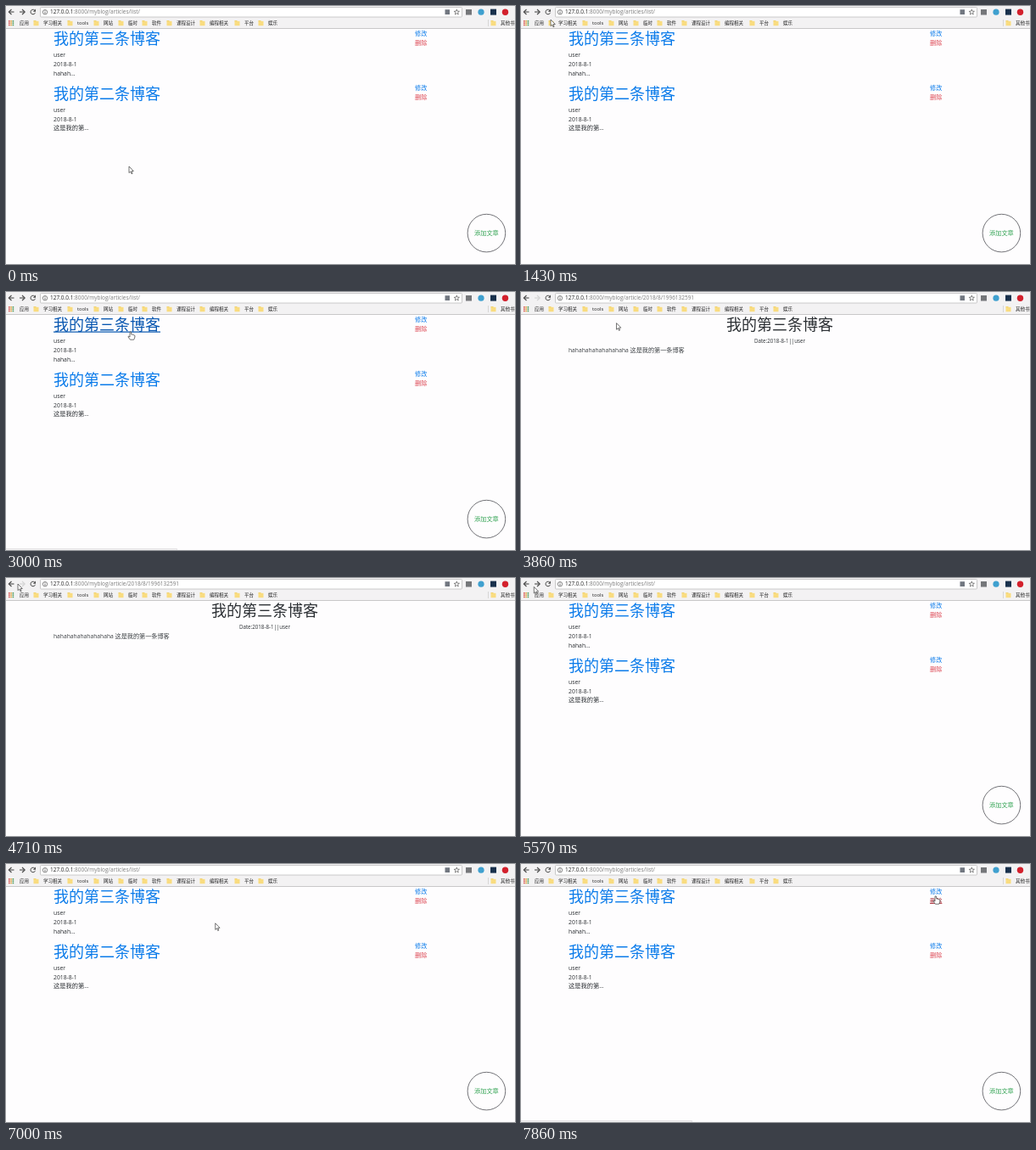
Animation, 600 px wide and 304 px high, one loop 8 s. Source, as an HTML page with a canvas:

```html
<!DOCTYPE html>
<html lang="zh">
<head>
<meta charset="utf-8">
<style>
html, body { margin: 0; width: 100%; height: 100%; overflow: hidden; background: #fefdfe; }
canvas { display: block; }
</style>
</head>
<body>
<canvas id="stage" width="600" height="304"></canvas>
<script>
const ctx = document.getElementById('stage').getContext('2d');
const LOOP = 8000, STEP = 1000 / 7;
const ARTICLE_OPEN = 24, ARTICLE_CLOSE = 38;
const INK = '#2b2f33', BLUE = '#0a7bea', RED = '#dc4450', ICON = '#4c4c4c';

// Pointer stops: step, x, y
const stops = [
  [0, 145, 189], [6, 46, 62], [8, 30, 9], [10, 35, 16], [17, 172, 157],
  [21, 147, 47], [24, 147, 47], [33, 14, 7], [35, 8, 5], [38, 8, 5],
  [43, 78, 57], [47, 170, 76], [53, 466, 52], [55, 489, 38]
];

const posts = [
  { y: 0, title: '我的第三条博客', intro: 'hahah...' },
  { y: 64.6, title: '我的第二条博客', intro: '这是我的第...' }
];

const bookmarks = [
  [44, '学习相关'], [84, 'tools'], [115, '网站'], [144, '临时'], [172, '软件'],
  [201, '课程设计'], [240, '编程相关'], [281, '平台'], [309, '娱乐'], [583, '其他书签']
];

function rect(x, y, w, h, color) {
  ctx.fillStyle = color;
  ctx.fillRect(x, y, w, h);
}

function disc(x, y, r, color) {
  ctx.fillStyle = color;
  ctx.beginPath();
  ctx.arc(x, y, r, 0, Math.PI * 2);
  ctx.fill();
}

function ring(x, y, r, color, width, from = 0, to = Math.PI * 2) {
  ctx.strokeStyle = color;
  ctx.lineWidth = width;
  ctx.beginPath();
  ctx.arc(x, y, r, from, to);
  ctx.stroke();
}

function path(points, x, y) {
  ctx.beginPath();
  points.forEach(([px, py], i) => ctx[i ? 'lineTo' : 'moveTo'](x + px, y + py));
}

function line(points, color, width = 1) {
  path(points, 0, 0);
  ctx.strokeStyle = color;
  ctx.lineWidth = width;
  ctx.stroke();
}

function setFont(run, size) {
  const latin = run.charCodeAt(0) < 256;
  ctx.font = latin
    ? `${size * 0.94}px "Open Sans", sans-serif`
    : `${size}px "Noto Sans CJK SC", "Noto Sans CJK", sans-serif`;
}

// Latin runs are set slightly smaller than the Chinese ones.
function text(str, x, y, size, color, center = false) {
  const runs = str.match(/[\x00-\xff]+|[^\x00-\xff]+/g);
  const widths = runs.map(run => {
    setFont(run, size);
    return ctx.measureText(run).width;
  });
  const total = widths.reduce((a, b) => a + b, 0);
  let at = center ? x - total / 2 : x;
  ctx.fillStyle = color;
  runs.forEach((run, i) => {
    setFont(run, size);
    ctx.fillText(run, at, y);
    at += widths[i];
  });
  return at;
}

function arrow(x, dir, color) {
  line([[x - 3 * dir, 7], [x + 3 * dir, 7]], color, 1.1);
  line([[x, 4], [x + 3.2 * dir, 7], [x, 10]], color, 1.1);
}

function folder(x) {
  rect(x, 17, 3, 1.2, '#efcf6c');
  rect(x, 17.8, 6, 5.4, '#f9dc80');
}

function star(x, y) {
  const points = Array.from({ length: 11 }, (_, i) => {
    const a = i * Math.PI / 5, r = i % 2 ? 1.4 : 3.3;
    return [x + r * Math.sin(a), y - r * Math.cos(a)];
  });
  line(points, '#555', 0.7);
}

function drawToolbar(article) {
  rect(0, 0, 600, 27, '#f3f2f3');
  rect(0, 26, 600, 1, '#c9c8c9');
  arrow(6.5, -1, ICON);
  arrow(19, 1, article ? '#d4d4d4' : ICON);
  ring(31.8, 7, 2.8, ICON, 1, 0.3, 5.5);
  path([[35, 3.6], [35, 6.8], [31.8, 6.8]], 0, 0);
  ctx.fillStyle = ICON;
  ctx.fill();

  ctx.beginPath();
  ctx.roundRect(40.5, 1.5, 497, 11.5, 1);
  ctx.fillStyle = '#fff';
  ctx.fill();
  ctx.strokeStyle = '#bdbdbd';
  ctx.lineWidth = 0.8;
  ctx.stroke();
  ring(46, 7.2, 2.7, '#555', 0.7);
  rect(45.6, 5.5, 0.8, 0.8, '#444');
  rect(45.6, 6.8, 0.8, 2, '#444');
  const x = text('127.0.0.1', 52, 9.4, 6.9, '#222');
  text(':8000/myblog/' + (article ? 'article/2018/8/1996132591' : 'articles/list/'), x, 9.4, 6.9, '#7c7c7c');

  rect(517.5, 4.2, 5.5, 5.8, '#717780');
  star(531.3, 7.3);
  rect(542, 4, 7, 6.5, '#75777a');
  disc(560, 7.2, 3.6, '#3fa0cf');
  rect(571, 3.6, 7, 7, '#18304c');
  disc(588.5, 7.2, 3.7, '#d3202c');

  const dots = ['#d9544f', '#e0a33c', '#4d9a5c', '#4b7fc4'];
  for (let i = 0; i < 9; i++) {
    const row = Math.floor(i / 3);
    rect(3 + (i % 3) * 2.3, 17 + row * 2.3, 1.6, 1.6, dots[(i + row) % 4]);
  }
  text('应用', 16, 22.2, 5.5, '#222');
  for (const [bx, label] of bookmarks) {
    folder(bx - 11.5);
    text(label, bx, 22.2, label === 'tools' ? 6.2 : 5.5, '#222');
  }
  rect(568, 16, 0.8, 8, '#cfcfcf');
}

function links() {
  return posts.flatMap(({ y, title }) => [
    { label: title, x: 56, top: y + 28, w: 126, h: 22, base: y + 45.4, size: 18, color: BLUE, dark: '#0756b0' },
    { label: '修改', x: 482, top: y + 27, w: 14.4, h: 10.6, base: y + 34.8, size: 7.2, color: BLUE, dark: '#0756b0' },
    { label: '删除', x: 482, top: y + 37.6, w: 14.4, h: 10.6, base: y + 45.6, size: 7.2, color: RED, dark: '#a72430' }
  ]);
}

function drawList(px, py) {
  let hover = false;
  for (const l of links()) {
    const on = px >= l.x && px <= l.x + l.w && py >= l.top && py < l.top + l.h;
    text(l.label, l.x, l.base, l.size, on ? l.dark : l.color);
    if (on) rect(l.x, l.base + l.size * 0.06, l.w, l.size > 10 ? 1.2 : 0.7, l.dark);
    hover = hover || on;
  }
  for (const { y, intro } of posts) {
    ['user', '2018-8-1', intro].forEach((s, i) => text(s, 56, y + 60.4 + i * 10.7, 7.25, INK));
  }
  ring(566.4, 267.6, 22.3, '#505056', 0.8);
  text('添加文章', 566.4, 270.4, 7.2, '#35a455', true);
  if (hover) {
    rect(0, 302, 202, 2, '#f4f3f4');
    line([[0, 302.5], [201.5, 302.5], [201.5, 304]], '#e2e1e2', 0.8);
  }
  return hover;
}

function drawArticle() {
  text('我的第三条博客', 305, 45.4, 18, INK, true);
  text('Date:2018-8-1||user', 305, 60.4, 6.6, INK, true);
  text('hahahahahahahahaha 这是我的第一条博客', 56, 71, 7.15, '#3c4044');
}

function drawPointer(x, y, hand) {
  const shape = hand
    ? [[-1, 0], [0.5, 0], [0.8, 3], [2.5, 3.2], [4.5, 4], [5, 5], [4.6, 7.2], [3.7, 9.2],
       [-0.6, 9.2], [-3, 6], [-2.6, 5], [-1, 6]]
    : [[0, 0], [0, 7.6], [1.8, 6], [3, 8.8], [4.1, 8.3], [3, 5.6], [5.3, 5.5]];
  path(shape, x, y);
  ctx.closePath();
  ctx.fillStyle = '#fff';
  ctx.fill();
  ctx.strokeStyle = '#3a3a3a';
  ctx.lineWidth = 0.7;
  ctx.lineJoin = 'round';
  ctx.stroke();
}

function pointerAt(step) {
  const i = Math.max(1, stops.findIndex(s => s[0] >= step));
  const [s0, x0, y0] = stops[i - 1], [s1, x1, y1] = stops[i];
  const u = (step - s0) / (s1 - s0), k = u * u * (3 - 2 * u);
  return [x0 + (x1 - x0) * k, y0 + (y1 - y0) * k];
}

function draw(ms) {
  const step = Math.min(55, Math.floor((ms % LOOP + 5) / STEP));
  const article = step >= ARTICLE_OPEN && step < ARTICLE_CLOSE;
  const [x, y] = pointerAt(step);
  rect(0, 0, 600, 304, '#fefdfe');
  drawToolbar(article);
  const hand = article ? drawArticle() : drawList(x, y);
  drawPointer(x, y, hand);
}

const start = performance.now();
function tick() {
  draw(performance.now() - start);
  requestAnimationFrame(tick);
}
tick();
</script>
</body>
</html>
```
